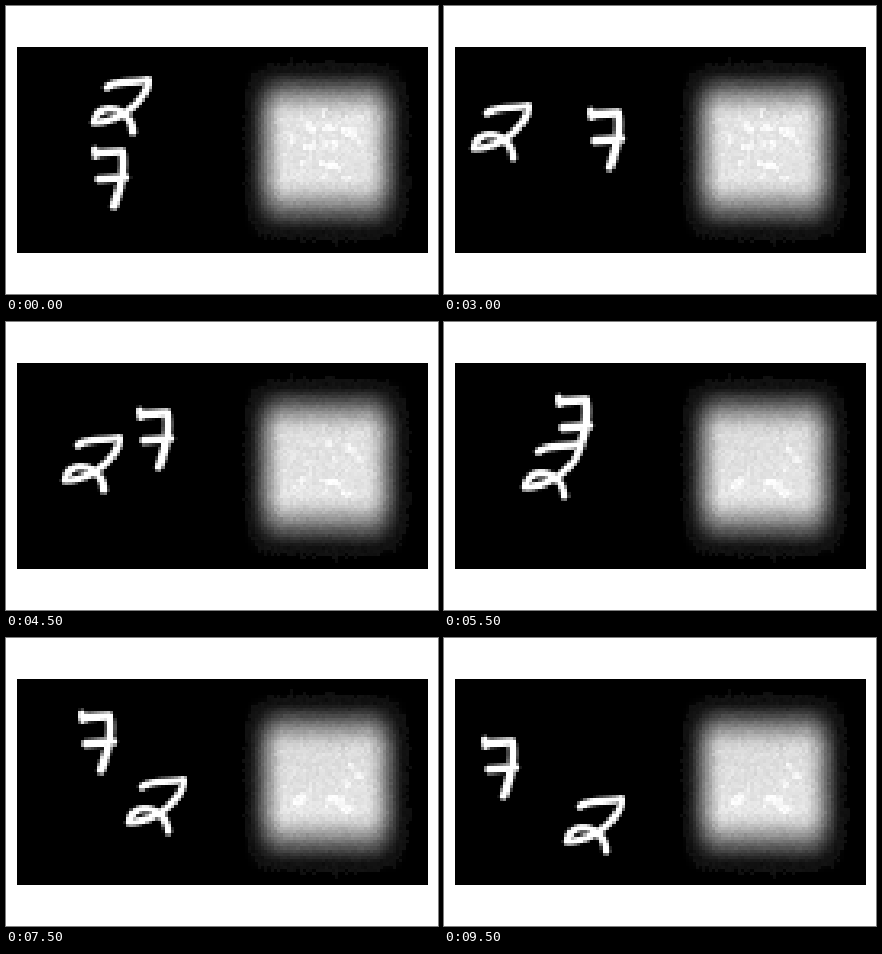
A matplotlib script for the animation above (10 s loop, 432 px wide and 288 px high).

```python
import numpy as np
import matplotlib.pyplot as plt
from matplotlib.animation import FuncAnimation

FRAMES, STEP_MS = 20, 500
SIZE, GLYPH = 64, 28
LIMIT = SIZE - GLYPH

rng = np.random.default_rng(7)
grid_x, grid_y = np.meshgrid(np.arange(SIZE) + 0.5, np.arange(SIZE) + 0.5)


def smoothstep(lo, hi, value):
    t = np.clip((value - lo) / (hi - lo), 0, 1)
    return t * t * (3 - 2 * t)


def bezier(controls, samples=80):
    """Points on a Bezier curve of any degree, by repeated interpolation."""
    t = np.linspace(0, 1, samples)[:, None]
    points = [np.array(c, float) for c in controls]
    while len(points) > 1:
        points = [a + (b - a) * t for a, b in zip(points, points[1:])]
    return points[0]


def draw_glyph(strokes, half_width):
    """Antialiased pen strokes on a small square grid."""
    pen = np.vstack([bezier(s) for s in strokes])
    centre = np.arange(GLYPH) + 0.5
    dx = centre[None, :, None] - pen[:, 0]
    dy = centre[:, None, None] - pen[:, 1]
    return np.clip(half_width + 0.5 - np.hypot(dx, dy).min(axis=2), 0, 1)


def bounce(start, speed):
    """Integer positions of a coordinate that sticks to a wall, then turns."""
    pos, path = start, []
    for _ in range(FRAMES):
        path.append(int(pos))
        pos += speed
        if pos <= 0 or pos >= LIMIT:
            pos = min(max(pos, 0), LIMIT)
            speed = -speed
    return path


def blurred_noise():
    field = rng.normal(size=(SIZE, SIZE))
    for axis in (0, 1):
        field = field + (np.roll(field, 1, axis) + np.roll(field, -1, axis)) * 0.7
    return field / field.std()


def spot(x, y, rx, ry):
    return np.exp(-((grid_x - x) / rx) ** 2 - ((grid_y - y) / ry) ** 2)


two = draw_glyph([
    [(10, 8.6), (13, 6.3), (19, 7.2), (22.8, 6.2)],
    [(22.8, 6.2), (23.5, 11), (15, 19.5), (6, 19.5)],
    [(6, 19.5), (7, 12.5), (17.5, 14.5), (18.1, 22.4)],
], 1.15)
seven = draw_glyph([
    [(8.3, 8), (8.6, 9.6)],
    [(8.6, 9), (16.7, 8.5)],
    [(16.7, 8.5), (18, 15), (14.2, 25.3)],
    [(9.6, 17.1), (17.8, 16.5)],
], 1.3)

digits = [
    (two, bounce(18.0, -3.3), bounce(4.1, 1.44)),
    (seven, bounce(16.6, 2.91), bounce(24.4, -1.92)),
]

plateau = (smoothstep(6, 20, grid_x) * smoothstep(58.5, 44.5, grid_x)
           * smoothstep(4, 23, grid_y) * smoothstep(61, 40, grid_y))
grain = rng.normal(size=(SIZE, SIZE))
patches = blurred_noise()
rim = np.abs((grid_x - 32.5) / 25.5) ** 5 + np.abs((grid_y - 32.5) / 27.8) ** 5
halo = 0.07 * (rim + 0.12 * grain < 1)
core = spot(33, 31, 14, 14)
early = core * (0.5 + 0.6 * patches)
late = (spot(40, 32, 5, 4) + spot(36.5, 39, 5, 3) + spot(24, 37.5, 4, 2)
        + 0.25 * patches)


def moving_digits(frame):
    panel = np.zeros((SIZE, SIZE))
    for glyph, xs, ys in digits:
        x, y = xs[frame], ys[frame]
        window = panel[y:y + GLYPH, x:x + GLYPH]
        np.maximum(window, glyph, out=window)
    return panel


def soft_square(frame):
    mix = smoothstep(5, 13, frame)
    sparkle = smoothstep(0.5, 0.9, (1 - mix) * early + mix * late)
    tilt = 0.03 * mix * np.clip((grid_y - 36) / 12, -1, 1)
    level = plateau * (0.89 + tilt + 0.09 * sparkle + 0.012 * grain)
    return np.clip(np.maximum(level, halo) + 0.008 * grain * (halo > 0), 0, 1)


def picture(frame):
    return np.hstack([moving_digits(frame), soft_square(frame)])


fig = plt.figure(figsize=(4.32, 2.88), dpi=100, facecolor="white")
ax = fig.add_axes([0.025, 41.4 / 288, 0.95, 205.2 / 288])
ax.axis("off")
image = ax.imshow(picture(0), cmap="gray", vmin=0, vmax=1,
                  interpolation="nearest", aspect="auto")


def update(frame):
    image.set_data(picture(frame))
    return [image]


animation = FuncAnimation(fig, update, frames=FRAMES, interval=STEP_MS,
                          repeat=True, repeat_delay=0)
plt.show()
```
